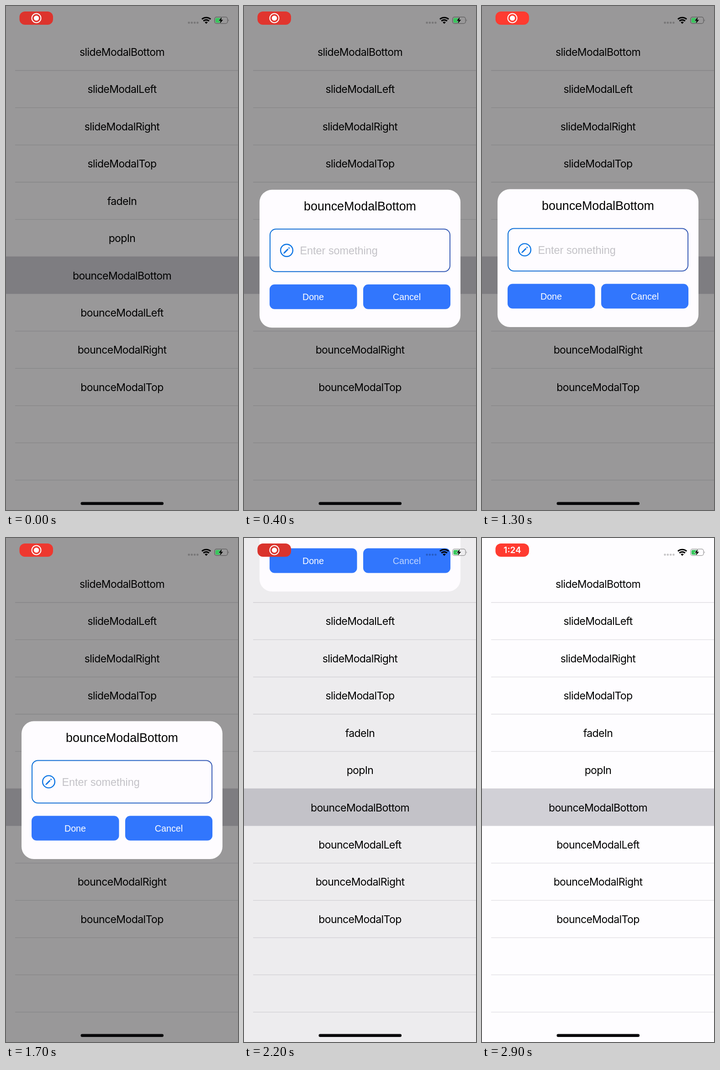
An HTML page that plays this animation: 508x1102 px, repeating every 3000 ms.

```html
<!DOCTYPE html>
<html lang="en">
<head>
<meta charset="utf-8">
<title>Bounce modal</title>
<style>
  html, body { margin: 0; width: 100%; height: 100%; overflow: hidden; background: #fefdff; }
  svg { display: block; width: 100%; height: 100%; }
  text { text-anchor: middle; }
  .row { font: 23px Inter, sans-serif; letter-spacing: -.6px; }
  .time { font: 600 19px Inter, sans-serif; fill: #fff; }
  #modal text { font-family: "Liberation Sans", Arial, sans-serif; }
  .title { font-size: 26.8px; }
  .hint { font-size: 23.4px; fill: #c3c2c7; text-anchor: start; }
  .label { font-size: 19.7px; fill: #fff; }
</style>
</head>
<body>
<svg viewBox="0 0 508 1102">
  <defs>
    <linearGradient id="edge" gradientUnits="userSpaceOnUse" x1="56" x2="452" y1="0" y2="0">
      <stop stop-color="#0c70d8"/><stop offset="1" stop-color="#3b5db6"/>
    </linearGradient>
  </defs>

  <rect width="508" height="1102" fill="#fefdff"/>
  <g id="list"></g>
  <rect id="dim" width="508" height="1102"/>

  <g id="modal">
    <rect x="34" width="440" height="301.5" rx="27" fill="#fefcff"/>
    <text class="title" x="254" y="45">bounceModalBottom</text>
    <rect x="57" y="86" width="394" height="93" rx="13" fill="none" stroke="url(#edge)" stroke-width="2"/>
    <g fill="none" stroke="#0e76e4">
      <circle cx="93.5" cy="132.5" r="13.4" stroke-width="2.4"/>
      <path d="M88 138L96.5 129.5M97.8 128.2L99.5 126.5" stroke-width="3"/>
      <path d="M86.5 139.5L89 137" stroke-width="1.6"/>
    </g>
    <text class="hint" x="122.5" y="141">Enter something</text>
    <g fill="#3176fd">
      <rect x="56" y="207" width="191.5" height="54" rx="11"/>
      <rect x="261" y="207" width="191" height="54" rx="11"/>
    </g>
    <text class="label" x="151.5" y="241.5">Done</text>
    <text class="label" x="356.5" y="241.5" id="cancel">Cancel</text>
  </g>

  <rect id="pill" x="29.5" y="12" width="73.5" height="29" rx="12"/>
  <g id="record">
    <circle cx="66.5" cy="26.5" r="10" fill="none" stroke="#fff" stroke-width="2"/>
    <circle cx="66.5" cy="26.5" r="5.6" fill="#fff"/>
  </g>
  <text class="time" id="clock" x="66.5" y="33.3">1:24</text>

  <path d="M400.5 36.5h.01m6.3 0h.01m6.3 0h.01m6.3 0h.01" stroke="#000" stroke-opacity=".22" stroke-width="4.6" stroke-linecap="round"/>
  <g fill="none" stroke="#000" stroke-width="3.2">
    <path d="M429 28.9A14.2 14.2 0 0 1 448 28.9"/>
    <path d="M432.3 32.7A9.2 9.2 0 0 1 444.7 32.7"/>
    <path d="M438.5 39L435.2 35.7A5 5 0 0 1 441.8 35.7Z" fill="#000" stroke="none"/>
  </g>
  <rect x="456.7" y="24.2" width="28.4" height="14.2" rx="4.4" fill="none" stroke="#000" stroke-opacity=".4" stroke-width="1.3"/>
  <path d="M486.8 29q2 2.3 0 4.6z" fill-opacity=".45"/>
  <path d="M461 26.2H471V36.4H461Q458.6 36.4 458.6 34V28.6Q458.6 26.2 461 26.2Z" fill="#37c75c"/>
  <path id="bolt" d="M472.5 24L465.8 32.2H469.8L468.3 38.6L475.2 30.2H471.2Z" stroke-width="1.5" paint-order="stroke"/>

  <rect x="163.5" y="1084.5" width="181.5" height="6.5" rx="3.25" fill="#08080a"/>
</svg>
<script>
const LOOP = 3000, STEP = 100;
const ROW = 81.42, FIRST_LINE = 141, SELECTED = 6;
const REST_Y = 400.5, BELOW_Y = 1102, ABOVE_Y = -302;
const names = ["slideModalBottom", "slideModalLeft", "slideModalRight", "slideModalTop", "fadeIn", "popIn",
  "bounceModalBottom", "bounceModalLeft", "bounceModalRight", "bounceModalTop"];

const el = id => document.getElementById(id);
const clamp = v => Math.min(1, Math.max(0, v));
const mix = (a, b, p) => a + (b - a) * p;
const wave = p => (1 - Math.cos(Math.PI * p)) / 2;

let rows = `<rect y="${FIRST_LINE + ROW * (SELECTED - 1) - .5}" width="508" height="${ROW + .5}" fill="#d1d0d6"/>`;
for (let i = 0; i < 12; i++) {
  const y = FIRST_LINE + ROW * i;
  if (i !== SELECTED && i !== SELECTED - 1)
    rows += `<path d="M20 ${y}H508" stroke="#dfdee2" stroke-width="1.3"/>`;
  if (names[i]) rows += `<text class="row" x="254" y="${y - 32}">${names[i]}</text>`;
}
el("list").innerHTML = rows;

// Underdamped spring from 0 to 1, time in seconds
function spring(t) {
  const decay = 14.7, freq = 23.4;
  if (t <= 0) return 0;
  return 1 - Math.exp(-decay * t) * (Math.cos(freq * t) + decay / freq * Math.sin(freq * t));
}

function draw(t) {
  const leave = wave(clamp((t - 2039) / 220));
  const y = leave ? mix(REST_Y, ABOVE_Y, leave) : mix(BELOW_Y, REST_Y, spring((t - 52) / 1000));
  el("modal").setAttribute("transform", `translate(0 ${y.toFixed(2)})`);

  const dim = .4 * (1 - leave);
  el("dim").setAttribute("opacity", dim);
  const backdrop = Math.round(254 * (1 - dim));
  el("bolt").setAttribute("stroke", `rgb(${backdrop},${backdrop},${backdrop})`);

  const pressed = t >= 1950;
  el("cancel").setAttribute("opacity", pressed ? mix(.2, 1, clamp((t - 2030) / 280)) : 1);

  const glow = clamp(1.3 * wave((t - 150) / 1000));
  el("pill").setAttribute("fill", `rgb(${mix(218, 255, glow)},${mix(52, 59, glow)},${mix(45, 48, glow)})`);
  const swap = clamp((t - 2240) / 250);
  el("record").setAttribute("opacity", 1 - swap);
  el("clock").setAttribute("opacity", swap);
}

function tick() {
  const t = performance.now() % LOOP;
  draw(Math.floor(t / STEP) * STEP);
  requestAnimationFrame(tick);
}
tick();
</script>
</body>
</html>
```
